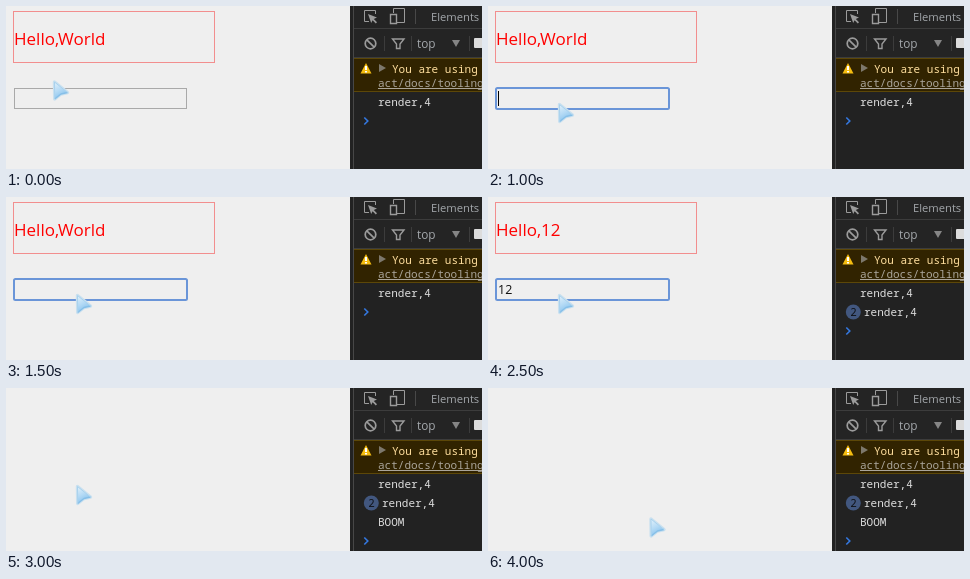
An HTML page with a canvas that plays this animation: 476 px wide and 163 px high, repeating every 4500 ms.

```html
<!DOCTYPE html>
<html lang="en">
<head>
<meta charset="utf-8">
<title>Controlled input and console</title>
<style>
html, body { margin: 0; width: 100%; height: 100%; overflow: hidden; background: #efefef; }
canvas { display: block; width: 476px; height: 163px; }
</style>
</head>
<body>
<canvas id="stage" width="476" height="163"></canvas>
<script>
const ctx = document.getElementById('stage').getContext('2d');
const LOOP = 4500, STEP = 500;
const SANS = '"Open Sans", "Noto Sans", sans-serif';
const MONO = '"Noto Sans Mono", "DejaVu Sans Mono", monospace';
const ICON = '#9b9b9b', RULE = '#3c3c3c';

function rect(x, y, w, h, color) {
  ctx.fillStyle = color;
  ctx.fillRect(x, y, w, h);
}

function frame(x, y, w, h, color) {
  ctx.strokeStyle = color;
  ctx.lineWidth = 1;
  ctx.strokeRect(x + .5, y + .5, w - 1, h - 1);
}

function text(str, x, y, size, color, family = SANS, weight = 400) {
  ctx.font = `${weight} ${size}px ${family}`;
  ctx.fillStyle = color;
  ctx.fillText(str, x, y);
}

function trace(points, close) {
  ctx.beginPath();
  points.forEach(([x, y]) => ctx.lineTo(x, y));
  if (close) ctx.closePath();
}

function fillShape(points, color) {
  trace(points, true);
  ctx.fillStyle = color;
  ctx.fill();
}

function line(points, color, width = 1, close = false) {
  trace(points, close);
  ctx.strokeStyle = color;
  ctx.lineWidth = width;
  ctx.stroke();
}

function drawPage(step) {
  rect(0, 0, 344, 163, '#efefef');
  if (step >= 6) return;

  const typed = step >= 4;
  frame(7, 5, 202, 52, '#f28e8e');
  text(typed ? 'Hello,12' : 'Hello,World', 8, 39, 17, '#f00');

  if (step < 2) {
    frame(8, 82, 173, 21, '#a9a9a9');
    return;
  }
  ctx.beginPath();
  ctx.roundRect(8, 82, 173, 21, 1.5);
  ctx.strokeStyle = '#6a95d8';
  ctx.lineWidth = 2;
  ctx.stroke();
  if (typed) text('12', 10, 97, 12.5, '#111');
  // the caret blinks once per second
  if (step % 2 === 0) rect(typed ? 24 : 10, 85, 1, 15, '#000');
}

function drawToolbars() {
  rect(348, 0, 128, 52, '#242424');
  rect(348, 22, 128, 1, RULE);
  rect(348, 51, 128, 1, RULE);

  // element picker
  line([[363, 15.5], [358.5, 15.5], [358.5, 4.5], [369.5, 4.5], [369.5, 8]], ICON);
  fillShape([[362, 8], [371, 11.5], [367.8, 13], [371, 16.2], [369.8, 17.4], [366.6, 14.3], [365.2, 17]], ICON);

  // device switch
  line([[387.5, 7], [387.5, 2.5], [398.5, 2.5], [398.5, 16.5], [391, 16.5]], ICON);
  line([[384.5, 8.5], [390.5, 8.5], [390.5, 17.5], [384.5, 17.5]], ICON, 1.4, true);

  rect(409, 3, 1, 15, '#484848');
  text('Elements', 425, 15, 11.2, '#a3a7ab');

  // clear button
  ctx.beginPath();
  ctx.arc(364.5, 37.5, 5.3, 0, Math.PI * 2);
  ctx.strokeStyle = ICON;
  ctx.lineWidth = 1.7;
  ctx.stroke();
  line([[360.8, 33.8], [368.2, 41.2]], ICON, 1.7);

  rect(378, 30, 1, 15, RULE);

  // filter
  line([[386.5, 33], [398, 33], [394, 38], [394, 42.5], [390.5, 42.5], [390.5, 38]], ICON, 1.4, true);

  rect(405, 30, 1, 15, RULE);
  text('top', 411, 42, 11.8, '#a3a7ab');
  fillShape([[446, 34], [454, 34], [450, 41]], '#858585');
  rect(463, 30, 1, 15, RULE);
  ctx.beginPath();
  ctx.roundRect(468, 32, 12, 10, 1);
  ctx.fillStyle = '#dcdcdc';
  ctx.fill();
}

function drawWarning() {
  rect(348, 52, 128, 34, '#312300');
  rect(348, 52, 128, 1, '#5c4708');
  rect(348, 85, 128, 1, '#5c4708');
  fillShape([[360, 57], [365.5, 67.5], [354.5, 67.5]], '#f5bd10');
  rect(359, 60, 2, 4, '#fff');
  rect(359, 65, 2, 1.5, '#fff');
  fillShape([[373, 58], [380, 62], [373, 66]], '#7d786c');
  text('You are using', 386, 67, 11, '#ffdf9e', MONO, 500);
  text('act/docs/tooling', 372, 81, 11, '#aaa59a', MONO);
  rect(372, 82, 104, 1, '#aaa59a');
}

function logRow(str, x, y) {
  text(str, x, y + 4, 11, '#dedede', MONO, 500);
}

function drawConsole(step) {
  rect(344, 0, 132, 163, '#222');
  rect(347, 0, 1, 163, '#474747');
  drawToolbars();
  drawWarning();

  let y = 96;
  logRow('render,4', 372, y);
  if (step >= 4) {
    y += 19;
    ctx.beginPath();
    ctx.arc(365.3, y, 7.5, 0, Math.PI * 2);
    ctx.fillStyle = '#42577f';
    ctx.fill();
    text('2', 362.2, y + 4, 10.8, '#10131a', MONO, 500);
    logRow('render,4', 376, y);
  }
  if (step >= 6) {
    y += 19;
    logRow('BOOM', 372, y);
  }
  y += 19;
  line([[358.3, y - 3.5], [361.8, y], [358.3, y + 3.5]], '#3478e0', 1.6);
}

function pointerAt(step) {
  if (step === 0) return [46.5, 74];
  if (step < 7) return [69.5, 96.5];
  return step === 7 ? [80.5, 97] : [161, 129];
}

function drawPointer([x, y]) {
  ctx.save();
  ctx.translate(x, y);
  const fill = ctx.createLinearGradient(3, 3, 10, 16);
  fill.addColorStop(0, '#dceefa');
  fill.addColorStop(.55, '#b4daf5');
  fill.addColorStop(1, '#8fc6ee');
  const arrow = [[2, 2], [15, 12.5], [8.5, 14], [2.2, 19]];
  ctx.lineJoin = 'round';
  line(arrow, '#c9e0ef', 3.4, true);
  fillShape(arrow, fill);
  line(arrow.slice(1), '#86bfe8', 1.4);
  line([arrow[3], arrow[0], arrow[1]], '#a9d2ee', 1);
  ctx.restore();
}

function draw(now) {
  const step = Math.floor((now % LOOP) / STEP);
  drawPage(step);
  drawConsole(step);
  drawPointer(pointerAt(step));
}

const start = performance.now();
function tick() {
  draw(performance.now() - start);
  requestAnimationFrame(tick);
}
tick();
</script>
</body>
</html>
```
